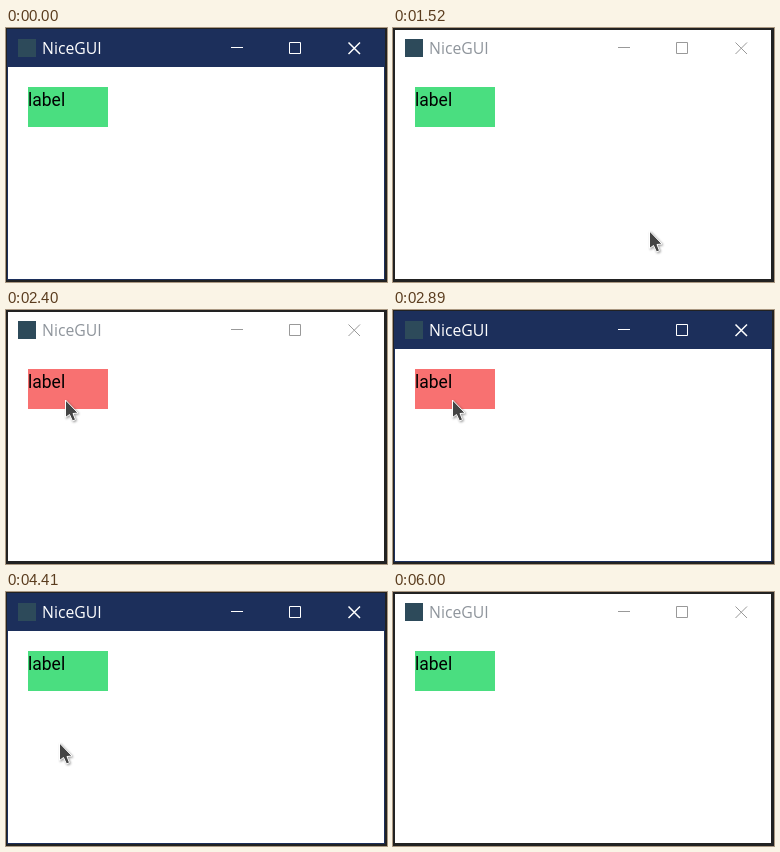
Recreate the animation shown at these times as an HTML page. Size 381 by 254 pixels, loop 6120 ms.

```html
<!DOCTYPE html>
<html lang="en">
<head>
<meta charset="utf-8">
<title>Hover label</title>
<style>
  html, body { margin: 0; width: 100%; height: 100%; overflow: hidden; background: #222; }
  svg { display: block; width: 381px; height: 254px; --ink: #999; --title: #8f959c; --bar: #fff; --edge: #222; }
  svg.active { --ink: #fff; --title: #fff; --bar: #1c2f5b; --edge: #1c2f5b; }
  #window { fill: #fff; stroke: var(--edge); }
  #bar { fill: var(--bar); }
  #title { fill: var(--title); font: 15.8px "Open Sans", sans-serif; }
  #buttons { fill: none; stroke: var(--ink); }
  .active #title { font-weight: 500; }
  .active #close { stroke-width: 1.5; }
  #label { font: 17.5px Roboto, sans-serif; }
  #cursor { fill: #444; stroke: #fff; stroke-linejoin: round; filter: drop-shadow(1px 1px 1px #0006); }
</style>
</head>
<body>
<svg id="stage" viewBox="0 0 381 254">
  <rect id="window" x="1.500" y="1.500" width="377" height="250"/>
  <rect id="bar" x="2" y="2" width="376" height="37"/>
  <rect x="12" y="11" width="18" height="18" fill="#2d4a5a"/>
  <text id="title" x="36" y="26">NiceGUI</text>
  <g id="buttons">
    <path d="M225 19.5h12M283.5 14.5h11v11h-11z"/>
    <path id="close" d="M342.5 14.5l11.5 11.5m0-11.5l-11.5 11.5"/>
  </g>
  <rect id="box" x="22" y="59" width="80" height="40"/>
  <text id="label" x="22" y="78">label</text>
  <path id="cursor" d="M.5 1V18.5L4.500 15.500L7.500 22L10.500 20.700L8 14.500L13 14Z"/>
</svg>
<script>
const LOOP = 6120, STEP = 40;
const stage = document.getElementById('stage');
const box = document.getElementById('box');
const cursor = document.getElementById('cursor');

// Each move eases from the previous stop to x, y; powX and powY bend its path
const moves = [
  { start: 420, end: 540, x: 310, y: 243 },
  { start: 710, end: 870, x: 304, y: 232 },
  { start: 950, end: 1150, x: 288, y: 208 },
  { start: 1400, end: 2040, x: 69, y: 109, powX: 1.15, powY: 1.7 },
  { start: 2040, end: 2400, x: 59, y: 89, powX: 0.6, powY: 0.6 },
  { start: 4170, end: 4410, x: 53, y: 150 },
  { start: 5390, end: 5630, x: 345, y: 262, powX: 1.4, powY: 1.4 }
];

function pointerAt(time) {
  let px = 312, py = 262;
  for (const { start, end, x, y, powX = 1, powY = 1 } of moves) {
    if (time < start) break;
    const elapsed = Math.floor((time - start) / STEP) * STEP;
    const p = Math.min(1, elapsed / (end - start));
    px += (x - px) * p ** powX;
    py += (y - py) * p ** powY;
  }
  return [Math.round(px), Math.round(py)];
}

function draw() {
  const time = performance.now() % LOOP;
  const [x, y] = pointerAt(time);
  const active = time < 250 || (time >= 2890 && time < 6000);
  const hover = x >= 22 && x < 102 && y >= 59 && y < 99;
  stage.classList.toggle('active', active);
  box.setAttribute('fill', hover ? '#f87171' : '#4ade80');
  cursor.setAttribute('transform', `translate(${x} ${y})`);
  requestAnimationFrame(draw);
}
draw();
</script>
</body>
</html>
```
